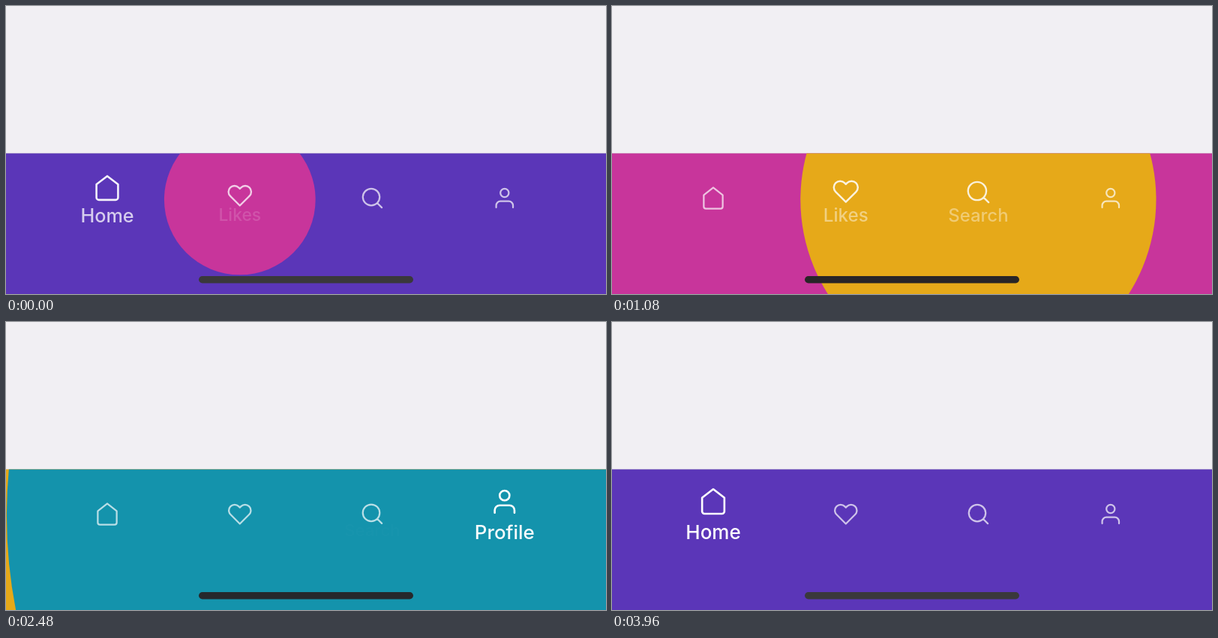
Write an HTML page that moves like this. It is 800x386 px and loops after 4000 ms.

```html
<!DOCTYPE html>
<html lang="en">
<head>
<meta charset="utf-8">
<title>Tab bar</title>
<style>
  html, body { margin: 0; width: 100%; height: 100%; overflow: hidden; background: #f1eff3; }
  svg { display: block; width: 100%; height: 100%; }
  text { font: 500 26px Inter, Roboto, sans-serif; fill: #fff; text-anchor: middle; }
  .icon { fill: none; stroke: #fff; stroke-width: 1.6; stroke-linecap: round; stroke-linejoin: round; }
</style>
</head>
<body>
<svg viewBox="0 0 800 386">
  <clipPath id="bar"><rect y="197.5" width="800" height="188.5"/></clipPath>
  <rect width="800" height="386" fill="#f1eff3"/>
  <g clip-path="url(#bar)">
    <rect id="base" y="197" width="800" height="189"/>
    <circle id="ripple" cy="259.5"/>
    <rect y="197" width="800" height="1" opacity=".12"/>
  </g>
  <g id="tabs"></g>
  <rect id="indicator" x="257" y="362" width="286" height="9.5" rx="4.75"/>
</svg>
<script>
const LOOP = 4000, FRAME = 40, BAR_MID = 259.5;

const tabs = [
  { label: 'Home', x: 135, color: '#5b36b8', pill: [58, 56, 59],
    icon: 'M3 9l9-7 9 7v11a2 2 0 0 1-2 2H5a2 2 0 0 1-2-2z' },
  { label: 'Likes', x: 311.8, color: '#c8359b', pill: [58, 54, 57],
    icon: 'M20.84 4.61a5.5 5.5 0 0 0-7.78 0L12 5.67l-1.06-1.06a5.5 5.5 0 0 0-7.78 7.78L12 21.23l8.84-8.84a5.5 5.5 0 0 0 0-7.78z' },
  { label: 'Search', x: 488.4, color: '#e6a919', pill: [20, 18, 18],
    icon: 'M3 11a8 8 0 1 0 16 0a8 8 0 1 0-16 0M21 21l-4.35-4.35' },
  { label: 'Profile', x: 664.8, color: '#1493ac', pill: [38, 40, 43],
    icon: 'M20 21v-2a4 4 0 0 0-4-4H8a4 4 0 0 0-4 4v2M8 7a4 4 0 1 0 8 0a4 4 0 1 0-8 0' }
];

// When each tab is tapped, in ms.
const taps = [
  { at: -40, to: 1 }, { at: 1000, to: 2 }, { at: 1960, to: 3 },
  { at: 2950, to: 0 }, { at: 3960, to: 1 }
];

// Fast start with a long settling tail: [ms since tap, progress].
const curve = [
  [0, 0], [40, .2], [80, .47], [120, .7], [160, .82], [200, .885], [240, .925],
  [280, .946], [330, .957], [410, .974], [520, .981], [600, .995], [640, 1]
];

const byId = id => document.getElementById(id);
const lerp = (a, b, p) => a + (b - a) * p;

function progress(ms) {
  const i = curve.findIndex(([t]) => t > ms);
  if (i < 0) return 1;
  const [t0, p0] = curve[i - 1], [t1, p1] = curve[i];
  return lerp(p0, p1, (ms - t0) / (t1 - t0));
}

function add(parent, name, attrs = {}) {
  const el = document.createElementNS(parent.namespaceURI, name);
  for (const key in attrs) el.setAttribute(key, attrs[key]);
  return parent.appendChild(el);
}

for (const tab of tabs) {
  tab.group = add(byId('tabs'), 'g');
  tab.iconBox = add(tab.group, 'g');
  add(tab.iconBox, 'path', {
    class: 'icon', d: tab.icon, transform: 'scale(1.65) translate(-12 -12)'
  });
  tab.text = add(tab.group, 'text', { y: 9.3 });
  tab.text.textContent = tab.label;
}

function poseTab(tab, active) {
  const scale = `scale(${lerp(.85, 1, active)})`;
  tab.group.setAttribute('opacity', lerp(.7, 1, active));
  tab.iconBox.setAttribute('transform', `translate(${tab.x} ${lerp(257.5, 240.5, active)}) ${scale}`);
  tab.text.setAttribute('transform', `translate(${tab.x} ${lerp(279.3, 282, active)}) ${scale}`);
  tab.text.setAttribute('opacity', active);
}

function draw(time) {
  const tap = taps.filter(({ at }) => at <= time).pop();
  const next = tabs[tap.to];
  const prev = tabs[(tap.to + 3) % 4];
  const p = progress(time - tap.at);
  const reach = Math.hypot(Math.max(next.x, 800 - next.x), 386 - BAR_MID);

  byId('base').setAttribute('fill', p < 1 ? prev.color : next.color);
  const ripple = byId('ripple');
  ripple.setAttribute('cx', next.x);
  ripple.setAttribute('r', reach * p);
  ripple.setAttribute('fill', next.color);

  for (const tab of tabs) poseTab(tab, tab === next ? p : tab === prev ? 1 - p : 0);

  const pill = prev.pill.map((c, i) => Math.round(lerp(c, next.pill[i], p)));
  byId('indicator').setAttribute('fill', `rgb(${pill})`);
}

const start = performance.now();
function tick() {
  const time = (performance.now() - start) % LOOP;
  draw(Math.floor(time / FRAME) * FRAME);
  requestAnimationFrame(tick);
}
tick();
</script>
</body>
</html>
```
